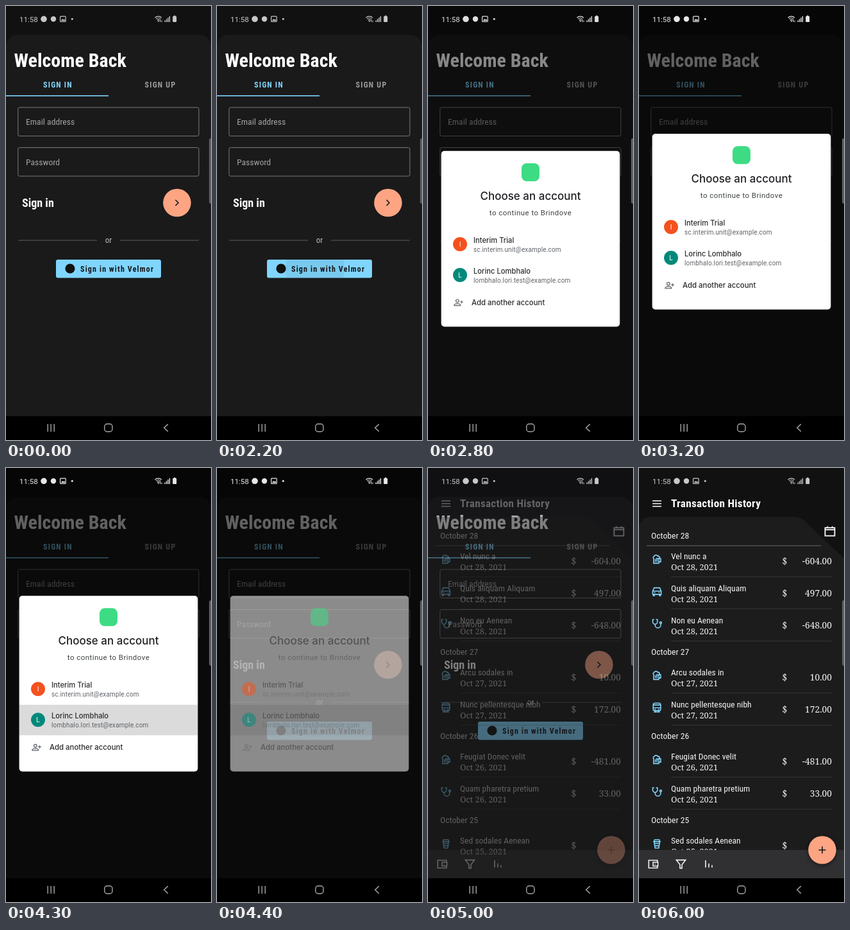
An HTML page with a canvas that plays this animation: 320 px wide and 676 px high, repeating every 6.8 s.

```html
<!DOCTYPE html>
<html lang="en">
<head>
<meta charset="utf-8">
<title>Sign in flow</title>
<style>
html, body { margin: 0; width: 100%; height: 100%; overflow: hidden; background: #000; }
canvas { display: block; width: 320px; height: 676px; }
</style>
</head>
<body>
<canvas id="stage"></canvas>
<script>
const W = 320, H = 676, LOOP = 6800, STEP = 100;
const BLUE = '#80d5fd', PEACH = '#fda583', INK = '#17171a', BACK = '#111112', PANEL = '#1a1a1b';
const canvas = document.getElementById('stage');
const ctx = canvas.getContext('2d');
const dpr = window.devicePixelRatio || 1;
canvas.width = W * dpr;
canvas.height = H * dpr;

const NARROW = '"Roboto Condensed", Roboto, "Liberation Sans", sans-serif';
const SANS = 'Roboto, "Liberation Sans", sans-serif';
const ROUND = 'Inter, "Open Sans", sans-serif';
const SERIF = '"Noto Serif", "Liberation Serif", serif';

// One narrowness for the whole face when no condensed cut is installed
const widthOf = font => { ctx.font = font; return ctx.measureText('Welcome Back').width; };
const hasNarrow = widthOf('700 condensed 30px ' + NARROW) < widthOf('700 30px Roboto, sans-serif') * 0.97;
const squeeze = hasNarrow ? 1 : 0.88;

const clamp = v => Math.max(0, Math.min(1, v));
const ramp = (t, a, b) => clamp((t - a) / (b - a));
const easeOut = p => 1 - (1 - p) ** 2;

function text(s, x, y, size, color, opt = {}) {
  const { family = SANS, weight = 400, gap = 0, align = 'left' } = opt;
  const narrow = family === NARROW;
  const k = narrow ? squeeze : 1;
  ctx.save();
  ctx.translate(x, y);
  ctx.scale(k, 1);
  ctx.font = `${weight} ${narrow ? 'condensed ' : ''}${size}px ${family}`;
  ctx.letterSpacing = gap / k + 'px';
  ctx.textAlign = align;
  ctx.fillStyle = color;
  ctx.fillText(s, 0, 0);
  ctx.restore();
}
const narrow = (s, x, y, size, color, opt) => text(s, x, y, size, color, { family: NARROW, ...opt });

function box(x, y, w, h, r, color) {
  ctx.beginPath();
  ctx.roundRect(x, y, w, h, r);
  ctx.fillStyle = color;
  ctx.fill();
}
function frame(x, y, w, h, r, color, width = 1) {
  ctx.beginPath();
  ctx.roundRect(x, y, w, h, r);
  ctx.strokeStyle = color;
  ctx.lineWidth = width;
  ctx.stroke();
}
function disc(x, y, r, color) {
  ctx.beginPath();
  ctx.arc(x, y, r, 0, Math.PI * 2);
  ctx.fillStyle = color;
  ctx.fill();
}
function path(d, x, y, scale, color, width, fill) {
  const p = new Path2D(d);
  ctx.save();
  ctx.translate(x, y);
  ctx.scale(scale, scale);
  if (fill) {
    ctx.fillStyle = color;
    ctx.fill(p);
  } else {
    ctx.strokeStyle = color;
    ctx.lineWidth = width / scale;
    ctx.stroke(p);
  }
  ctx.restore();
}

// Line icons on a 24 unit grid
const ICONS = {
  beer: 'M5 9v11h11V9 M16 10h4v7h-4 M8.7 11v6 M12.3 11v6 M5 10a3 3 0 0 1 1-5a4.5 4.5 0 0 1 8 0a2.6 2.6 0 0 1 2 5h-6',
  bus: 'M6 4h12l3 7v7H3v-7z M3 11h18 M4.5 18v3h2v-3 M17.5 18v3h2v-3 M6 14.5h2.5 M15.5 14.5h2.5',
  care: 'M6 3H3v5a5 5 0 0 0 10 0V3h-3 M8 13v2a6 6 0 0 0 12 0v-3 M22 10a2 2 0 1 1-4 0a2 2 0 1 1 4 0',
  train: 'M8 2h8a4 4 0 0 1 4 4v9a3 3 0 0 1-3 3H7a3 3 0 0 1-3-3V6a4 4 0 0 1 4-4z M4 6h16 M4 12h16 M7 15h2.5 M14.5 15h2.5 M6 22l3-4 M18 22l-3-4 M7 21h10',
  cup: 'M4 7h16 M6 7l1-4h10l1 4 M6 7l2 14h8l2-14 M6.8 11h10.4 M7.4 16h9.2',
  calendar: 'M3 5h18v15H3z M3 8.5h18 M7.5 2v4 M16.5 2v4',
  wallet: 'M21 7V4H3v16h18v-3 M12 8h10v8H12z M15.5 12h1.5',
  funnel: 'M3 4h18l-7 9v7h-4v-7z',
  bars: 'M4 3v18 M12 11v10 M20 15v6',
  person: 'M13 8a3.5 3.5 0 1 1-7 0a3.5 3.5 0 1 1 7 0 M2 19c0-6 15-6 15 0z M19.5 7v7 M16 10.5h7'
};
const icon = (name, cx, cy, size, color, width = 1.4) =>
  path(ICONS[name], cx - size / 2, cy - size / 2, size / 24, color, width);

function signIn(t) {
  ctx.fillStyle = BACK;
  ctx.fillRect(0, 0, W, 639);
  box(0, 45, W, 594, [18, 18, 0, 0], PANEL);
  narrow('Welcome Back', 12.5, 95, 30, '#fff', { weight: 700 });
  narrow('SIGN IN', 58, 127, 12, BLUE, { weight: 700, gap: 1.2 });
  narrow('SIGN UP', 216.5, 127, 12, '#9c9c9c', { weight: 700, gap: 1.2 });
  ctx.fillStyle = BLUE;
  ctx.fillRect(0, 139, 160, 1.6);

  [['Email address', 158], ['Password', 220.5]].forEach(([label, y]) => {
    frame(18.8, y, 282.2, 44.5, 2.5, '#7a7a7b');
    narrow(label, 31, y + 27, 13.7, '#a4a4a5');
  });

  narrow('Sign in', 25, 313, 18, '#fff', { weight: 700 });
  disc(267, 306.5, 21.8, PEACH);
  path('M0 0l4.5 4.5l-4.5 4.5', 264.5, 302, 1, INK, 1.6);

  ctx.fillStyle = '#5d5d5e';
  ctx.fillRect(19, 364.5, 123, 1);
  ctx.fillRect(178, 364.5, 123, 1);
  narrow('or', 160, 369, 13, '#bcbcbc', { align: 'center' });

  box(78, 395, 164, 28.5, 3, BLUE);
  const press = ramp(t, 2100, 2500), lift = ramp(t, 2500, 2800);
  if (press > 0 && lift < 1) {
    ctx.save();
    ctx.beginPath();
    ctx.roundRect(78, 395, 164, 28.5, 3);
    ctx.clip();
    disc(153, 409, 25 + 85 * press, `rgba(0,0,0,${0.06 * (1 - lift)})`);
    ctx.restore();
  }
  disc(100, 409, 7.6, '#111');
  narrow('Sign in with Velmor', 116, 413.5, 12, '#121519', { weight: 700, gap: 1.15 });
}

function dialog(y, alpha, pressed) {
  ctx.save();
  ctx.globalAlpha = alpha;
  ctx.translate(0, y);
  box(20.6, -0.3, 278.8, 273.8, 5, '#fff');
  if (pressed) {
    ctx.fillStyle = 'rgba(0,0,0,.14)';
    ctx.fillRect(20.6, 169.5, 278.8, 47.5);
  }
  box(146, 19, 28, 28, 8, '#3ddc84');
  const round = { family: ROUND, weight: 500 };
  text('Choose an account', 160, 76, 17, '#202124', { ...round, align: 'center' });
  text('to continue to Brindove', 160, 99.5, 11.5, '#3c4043', { gap: 0.45, align: 'center' });
  const account = (cy, color, name, mail) => {
    disc(50, cy, 11, color);
    text(name[0], 50, cy + 3.6, 10, '#fff', { align: 'center' });
    text(name, 71, cy - 2.5, 11.2, '#2b2c2f', round);
    text(mail, 71, cy + 12, 10, '#5f6368', { gap: 0.15 });
  };
  account(145, '#f4511e', 'Interim Trial', 'sc.interim.unit@example.com');
  account(193, '#00897b', 'Lorinc Lombhalo', 'lombhalo.lori.test@example.com');
  icon('person', 47.5, 236, 16, '#5f6368', 1.2);
  text('Add another account', 68, 239.5, 11.4, '#2b2c2f', round);
  ctx.restore();
}

const DAYS = [
  [28, 105, [['beer', 'Vel nunc a', '-604.00'], ['bus', 'Quis aliquam Aliquam', '497.00'], ['care', 'Non eu Aenean', '-648.00']]],
  [27, 286, [['beer', 'Arcu sodales in', '10.00'], ['train', 'Nunc pellentesque nibh', '172.00']]],
  [26, 417, [['beer', 'Feugiat Donec velit', '-481.00'], ['care', 'Quam pharetra pretium', '33.00']]],
  [25, 548, [['cup', 'Sed sodales Aenean', '']]]
];

function history() {
  const pale = '#f4f4f4';
  ctx.fillStyle = BACK;
  ctx.fillRect(0, 0, W, 639);
  path('M0 595V94a18 18 0 0 1 18-18H242q10 0 17 7L320 141V595z', 0, 0, 1, '#1c1c1d', 0, true);
  path('M21 51.2h14 M21 55.5h14 M21 59.8h14', 0, 0, 1, '#fff', 1.6);
  narrow('Transaction History', 50, 61, 17.2, '#fff', { weight: 700, gap: 0.27 });
  icon('calendar', 298, 99, 20, '#fff', 1.8);
  ctx.fillStyle = '#6a6a6b';
  ctx.fillRect(12, 120.5, 272, 1);

  DAYS.forEach(([day, mid, rows], d) => {
    narrow('October ' + day, 19, mid + 5, 13.7, pale);
    rows.forEach(([kind, name, sum], i) => {
      const y = mid + 31 + i * 50;
      icon(kind, 28, y + 6.5, 17.5, BLUE, 1.6);
      narrow(name, 50, y + 5.5, 13.6, pale);
      text(`Oct ${day}, 2021`, 50, y + 22.5, 12.8, pale, { family: SERIF });
      text('$', 223.5, y + 13.5, 14, pale, { family: SERIF });
      text(sum, 301, y + 13.5, 13.8, pale, { family: SERIF, align: 'right' });
      ctx.fillStyle = '#343435';
      if (d < 3) ctx.fillRect(50, y + 33, 251, 1);
    });
  });

  ctx.fillStyle = '#303032';
  ctx.fillRect(0, 595, W, 44);
  icon('wallet', 22, 617, 18, '#f2f2f2', 1.6);
  icon('funnel', 65.5, 617, 19, '#f2f2f2', 1.6);
  icon('bars', 109, 616.5, 15, '#f2f2f2', 1.6);

  ctx.save();
  ctx.shadowColor = 'rgba(0,0,0,.5)';
  ctx.shadowBlur = 6 * dpr;
  ctx.shadowOffsetY = 2 * dpr;
  disc(286, 595, 21.8, PEACH);
  ctx.restore();
  path('M280.5 595h11 M286 589.5v11', 0, 0, 1, INK, 1.6);
}

function system(dim) {
  const v = Math.round(200 + 50 * dim);
  const c = `rgb(${v},${v},${v})`;
  text('11:58', 21, 24.8, 11.6, c);
  disc(59, 20.3, 4.8, c);
  disc(74, 20.3, 4.2, c);
  frame(84.6, 16.2, 8.6, 8.2, 1, c, 1.2);
  path('M86 23l2-3l1.5 1.6l1.3-1.4l2 2.8z', 0, 0, 1, c, 0, true);
  disc(103.3, 20.3, 1.5, c);
  path('M232.5 18.2a7.5 7.5 0 0 1 10.5 0 M234.3 20.2a5 5 0 0 1 7 0 M236 22.2a2.6 2.6 0 0 1 3.5 0', 0, 0, 1, c, 1.2);
  disc(237.8, 23.8, 1, c);
  path('M240.8 21v4 M243 22.5v2.5', 0, 0, 1, c, 1);
  ctx.fillStyle = c;
  for (let i = 0; i < 4; i++) ctx.fillRect(247.5 + i * 2.4, 22.5 - i * 2.2, 1.4, 2.5 + i * 2.2);
  box(260.2, 16, 6, 9, 1, c);
  ctx.fillRect(261.9, 14.8, 2.6, 1.4);

  box(317, 206, 6, 102, 3, '#5c5c5d');

  ctx.fillStyle = '#000';
  ctx.fillRect(0, 639, W, 37);
  const nav = '#a6a6a6';
  path('M65.2 651v12 M70.2 651v12 M75.2 651v12', 0, 0, 1, nav, 1.4);
  frame(153.8, 651, 12.2, 12, 4, nav, 1.4);
  path('M252.8 651.2l-6 5.8l6 5.8', 0, 0, 1, nav, 1.5);
}

function draw(t) {
  ctx.setTransform(dpr, 0, 0, dpr, 0, 0);
  ctx.globalAlpha = 1;
  const settle = easeOut(ramp(t, 2800, 3200));
  const dim = (0.47 * ramp(t, 2400, 2800) + 0.15 * settle) * (1 - ramp(t, 4400, 4600));
  const shown = ramp(t, 2500, 2700) * (1 - ramp(t, 4300, 4510));
  const page = ramp(t, 4900, 5200);

  if (page < 1) signIn(t);
  if (dim > 0) {
    ctx.fillStyle = `rgba(0,0,0,${dim})`;
    ctx.fillRect(0, 0, W, 639);
  }
  if (shown > 0) dialog(226 - 26.7 * settle, shown, t >= 4300);
  if (page > 0) {
    ctx.globalAlpha = page;
    history();
    ctx.globalAlpha = 1;
  }
  system(dim);
}

const start = performance.now();
function tick() {
  const t = (performance.now() - start) % LOOP;
  draw(Math.floor(t / STEP) * STEP);
  requestAnimationFrame(tick);
}
tick();
</script>
</body>
</html>
```
